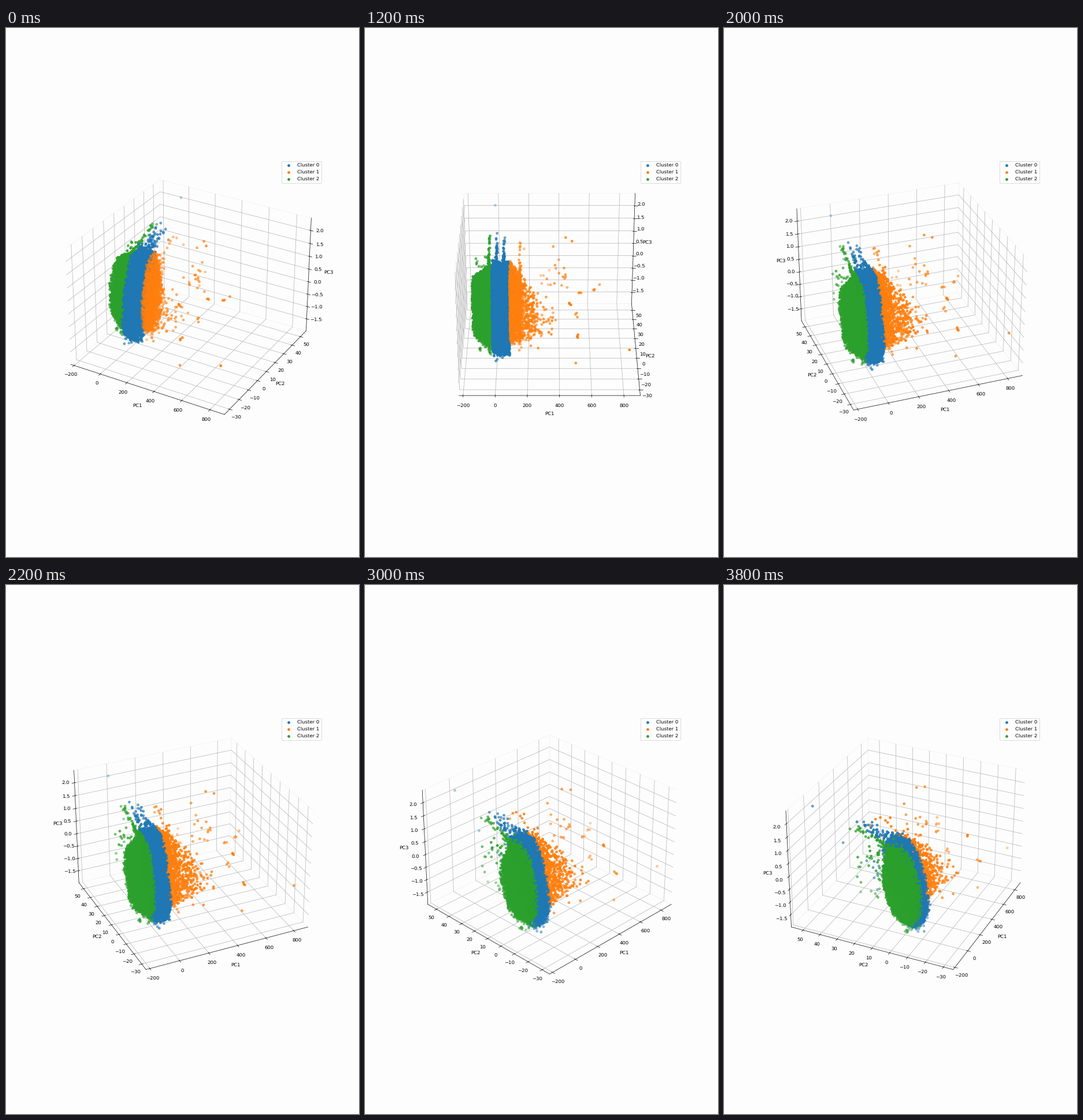
Write a matplotlib script that moves like this. It is 611 px wide and 917 px high and loops after 4 s.

```python
import numpy as np
import matplotlib.pyplot as plt
from matplotlib.animation import FuncAnimation

W, H, DPI = 611, 917, 61.1
FRAMES, INTERVAL = 20, 200
BG = "#fdfdfd"
COLORS = ("#1f77b4", "#ff7f0e", "#2ca02c")

plt.rcParams["text.hinting"] = "none"
rng = np.random.default_rng(7)


def egg(x, center, half_y, half_z, lean, scale=1, soft=0.04, cap=1.5):
    """Leaning ellipse in PC2/PC3 for each PC1 value, cut flat at the top."""
    n = len(x)
    a = rng.uniform(0, 2 * np.pi, n)
    rho = np.sqrt(rng.random(n)) * (1 + soft * np.abs(rng.normal(size=n)))
    rho = rho * scale
    z = 0.07 + half_z * rho * np.sin(a)
    y = center + lean * z + half_y * rho * np.cos(a)
    return np.column_stack([x, y, z])[z < cap]


def sheet(x0, n, half_y, half_z, tail):
    """Thin sheet at one PC1 value with a tail towards high PC2 and PC3."""
    body = egg(rng.normal(x0, 4, n), 0, half_y, half_z, 3, soft=0.08, cap=1.8)
    t = rng.random(tail) ** 2.2
    top = np.column_stack([
        rng.normal(x0, 3, tail),
        5 + 19 * t + rng.normal(0, 2, tail),
        1.3 + 0.55 * t + rng.normal(0, 0.07, tail),
    ])
    return np.vstack([body, top])


def fringe(lo, hi, n, reach):
    """Sparse points on the high PC2 side."""
    return np.column_stack([
        rng.uniform(lo, hi, n),
        9 + rng.exponential(reach, n).clip(0, 13),
        rng.normal(0.5, 0.6, n).clip(-1.2, 1.6),
    ])


def haze(n, x, y, z):
    """Loose points, each axis given as (mean, spread)."""
    return np.column_stack([rng.normal(*axis, n) for axis in (x, y, z)])


def blue():
    x = rng.uniform(-27, 85, 4200)
    lone = [(-19, 51.1, 2.2), (0, 34.9, 1.02), (-4, -11, -1.65)]
    return np.vstack([
        egg(x, 0, 9, 1.65, 3.4),
        sheet(2, 240, 10, 1.65, 60),
        sheet(48, 240, 10, 1.65, 50),
        fringe(-20, 75, 30, 4),
        haze(8, (10, 15), (-8, 1.5), (-1.5, 0.06)),
        lone,
    ])


def orange():
    x = 85 + rng.exponential(40, 1700)
    x = x[x < 250]
    # the cloud slides towards low PC2 and shrinks as PC1 grows
    bulk = egg(x, 3.5 - 0.07 * (x - 85), 8, 1.45, 2.5,
               scale=1 - 0.003 * (x - 85))
    trail_x = 205 + rng.exponential(60, 80).clip(0, 170)
    trail = haze(80, (0, 1), (-6, 5.5), (-0.2, 0.38))
    trail[:, 0] += trail_x

    clumps = [(522, -23.5, -0.2), (534, 1.7, 0.5), (620, 5.2, 0.5),
              (442, 4.6, 1.1), (500, -5.6, -0.07), (465, -18, 0.85)]
    clumps = np.repeat(clumps, 3, axis=0)
    clumps = clumps + rng.normal(0, (9, 0.7, 0.06), clumps.shape)
    lone = [(831, -29.1, -0.47), (502, -23.3, -1.22), (655, 6.2, 0.68),
            (361, 14.3, 1.85), (152, 14.1, 1.87)]
    return np.vstack([
        bulk,
        sheet(150, 110, 9, 1.4, 10),
        trail,
        haze(12, (410, 50), (7, 3), (1.1, 0.35)),
        haze(7, (280, 40), (20, 4), (0.8, 0.4)),
        haze(6, (310, 40), (-14, 3), (-0.65, 0.3)),
        clumps,
        lone,
    ])


def green():
    x = -26 - 125 * rng.beta(1, 1.35, 3300)
    return np.vstack([
        egg(x, -0.4, 9.8, 1.55, 2.5, scale=1 + 0.003 * (x + 26), cap=1.4),
        sheet(-46, 200, 9, 1.6, 45),
        fringe(-135, -30, 40, 4.5),
        haze(5, (-46, 1), (23, 3), (1.8, 0.05)),
        haze(5, (-105, 2), (-5, 0.6), (-1.45, 0.06)),
    ])


fig = plt.figure(figsize=((W + 0.01) / DPI, (H + 0.01) / DPI), dpi=DPI,
                 facecolor=BG)
ax = fig.add_subplot(111, projection="3d", facecolor=BG)

for i, (pts, color) in enumerate(zip((blue(), orange(), green()), COLORS)):
    ax.scatter(*pts.T, color=color, label=f"Cluster {i}")

ax.set(xlabel="PC1", ylabel="PC2", zlabel="PC3",
       xticks=np.arange(-200, 801, 200),
       yticks=np.arange(-30, 51, 10),
       zticks=np.arange(-1.5, 2.1, 0.5))
ax.set_xlim(-225.5, 902)
ax.set_ylim(-35.3, 57)
ax.set_zlim(-1.993, 2.475)
for axis in (ax.xaxis, ax.yaxis, ax.zaxis):
    axis.pane.set(facecolor=BG, edgecolor="#f3f3f3", alpha=1)
ax.legend(loc="upper right")


def update(i):
    # the small offset keeps the side wall on the left at the head-on view
    ax.view_init(elev=30, azim=-59.999 - 5 * i)
    return []


anim = FuncAnimation(fig, update, frames=FRAMES, interval=INTERVAL,
                     repeat=True, repeat_delay=0, blit=False)
plt.show()
```
